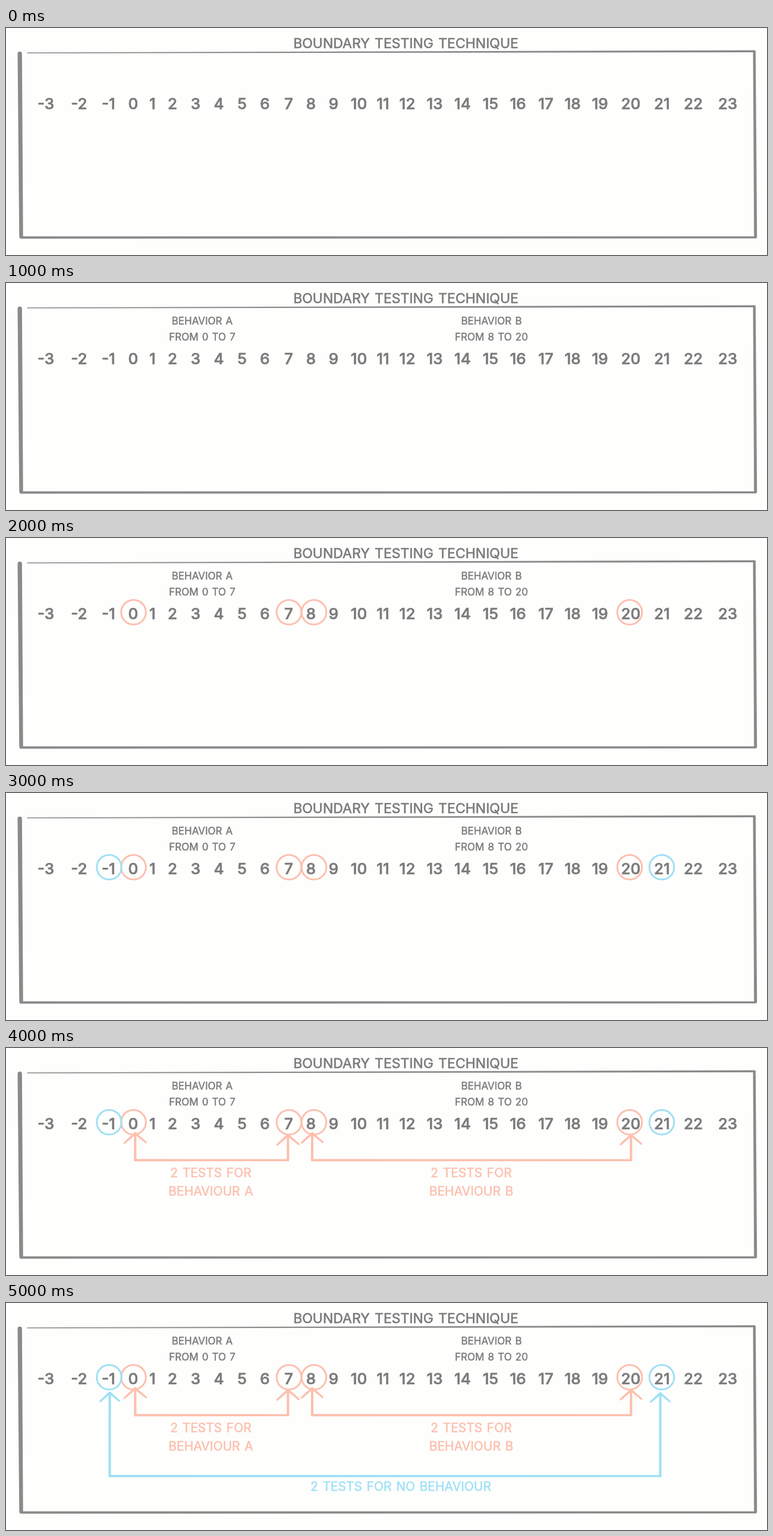
Recreate the animation shown at these times as an HTML page with a canvas. Size 1280 px wide and 383 px high, loop 6000 ms.

```html
<!DOCTYPE html>
<html lang="en">
<head>
<meta charset="utf-8">
<title>Boundary testing technique</title>
<style>
html, body { margin: 0; width: 100%; height: 100%; overflow: hidden; background: #fefefd; }
canvas { display: block; }
</style>
</head>
<body>
<canvas id="stage" width="1280" height="383"></canvas>
<script>
const ctx = document.getElementById('stage').getContext('2d');
const STEP_MS = 1000, STEPS = 6;
const PAPER = '#fefefd', FRAME = '#8a8a8a', INK = '#7b7b7b', CORAL = '#fcc0af', SKY = '#a0e0f5';
const FIRST_NUMBER = -3;
const NUMBER_X = [67, 123, 172.5, 214, 246.5, 280, 319, 358, 397, 435.5, 475.5, 513, 551, 593.5,
  634, 675, 721, 768, 815, 861, 908, 953, 999, 1051, 1103.5, 1156, 1214];

// A thin rounded outline softens the letters like a felt pen.
function write(text, x, baseline, size, color, weight = 400) {
  ctx.font = `${weight} ${size}px Inter, "Open Sans", sans-serif`;
  ctx.wordSpacing = `${size * 0.08}px`;
  ctx.textAlign = 'center';
  ctx.fillStyle = ctx.strokeStyle = color;
  ctx.lineWidth = size * 0.028;
  ctx.fillText(text, x, baseline);
  ctx.strokeText(text, x, baseline);
}

// A pen stroke whose width runs from w1 to w2.
function taper(x1, y1, w1, x2, y2, w2, color) {
  const length = Math.hypot(x2 - x1, y2 - y1);
  const nx = (y1 - y2) / length / 2, ny = (x2 - x1) / length / 2;
  ctx.fillStyle = color;
  ctx.beginPath();
  ctx.moveTo(x1 + nx * w1, y1 + ny * w1);
  ctx.lineTo(x2 + nx * w2, y2 + ny * w2);
  ctx.arc(x2, y2, w2 / 2, Math.atan2(ny, nx), Math.atan2(-ny, -nx), true);
  ctx.lineTo(x1 - nx * w1, y1 - ny * w1);
  ctx.arc(x1, y1, w1 / 2, Math.atan2(-ny, -nx), Math.atan2(ny, nx), true);
  ctx.fill();
}

function ring(x, color) {
  ctx.strokeStyle = color;
  ctx.lineWidth = 3;
  ctx.beginPath();
  ctx.arc(x, 125.3, 20.8, 0, Math.PI * 2);
  ctx.stroke();
}

function arrow(x, tip, base, reach, color) {
  taper(x, base, 4.2, x, tip, 4, color);
  taper(x, tip, 4, x - reach, tip + reach * 0.9, 3.2, color);
  taper(x, tip, 4, x + reach, tip + reach * 0.85, 3.2, color);
}

function bracket(left, leftTip, right, rightTip, base, reach, color) {
  arrow(left, leftTip, base, reach, color);
  arrow(right, rightTip, base, reach, color);
  taper(left, base, 4, right, base, 3.6, color);
}

function drawBoard() {
  taper(23.2, 43.5, 7.4, 25.5, 351.5, 6.4, FRAME);
  taper(36, 42, 1.4, 1259, 39.2, 3.6, FRAME);
  taper(1258.7, 40, 4.4, 1260.7, 352, 5, FRAME);
  taper(25, 353.5, 4.2, 1261, 353.3, 3.6, FRAME);
  write('BOUNDARY TESTING TECHNIQUE', 672.5, 33.5, 23, INK);
}

function drawRanges() {
  write('BEHAVIOR A', 330, 70.3, 17, INK);
  write('FROM 0 TO 7', 330, 96.5, 17, INK);
  write('BEHAVIOR B', 816.5, 70.3, 17, INK);
  write('FROM 8 TO 20', 816.5, 96.5, 17, INK);
}

function drawBehaviourTests() {
  bracket(217.3, 144, 474.3, 147, 189.3, 18, CORAL);
  bracket(515, 144, 1051.3, 147, 189.3, 17.5, CORAL);
  write('2 TESTS FOR', 344.5, 217.7, 21, CORAL);
  write('BEHAVIOUR A', 344.5, 248.5, 21, CORAL);
  write('2 TESTS FOR', 782.5, 217.7, 21, CORAL);
  write('BEHAVIOUR B', 782.5, 248.5, 21, CORAL);
}

function drawOutsideTests() {
  bracket(174.5, 151.5, 1100.5, 152.5, 292, 16, SKY);
  write('2 TESTS FOR NO BEHAVIOUR', 664, 316.5, 21, SKY);
}

function render(now) {
  const step = Math.floor(now / STEP_MS) % STEPS;
  ctx.fillStyle = PAPER;
  ctx.fillRect(0, 0, 1280, 383);
  ctx.lineJoin = 'round';
  drawBoard();
  if (step >= 1) drawRanges();
  if (step >= 2) [214.5, 476, 518, 1049].forEach(x => ring(x, CORAL));
  if (step >= 3) [173.5, 1103].forEach(x => ring(x, SKY));
  if (step >= 4) drawBehaviourTests();
  if (step >= 5) drawOutsideTests();
  NUMBER_X.forEach((x, i) => write(String(FIRST_NUMBER + i), x, 137, 26, INK, 500));
  requestAnimationFrame(render);
}
requestAnimationFrame(render);
</script>
</body>
</html>
```
